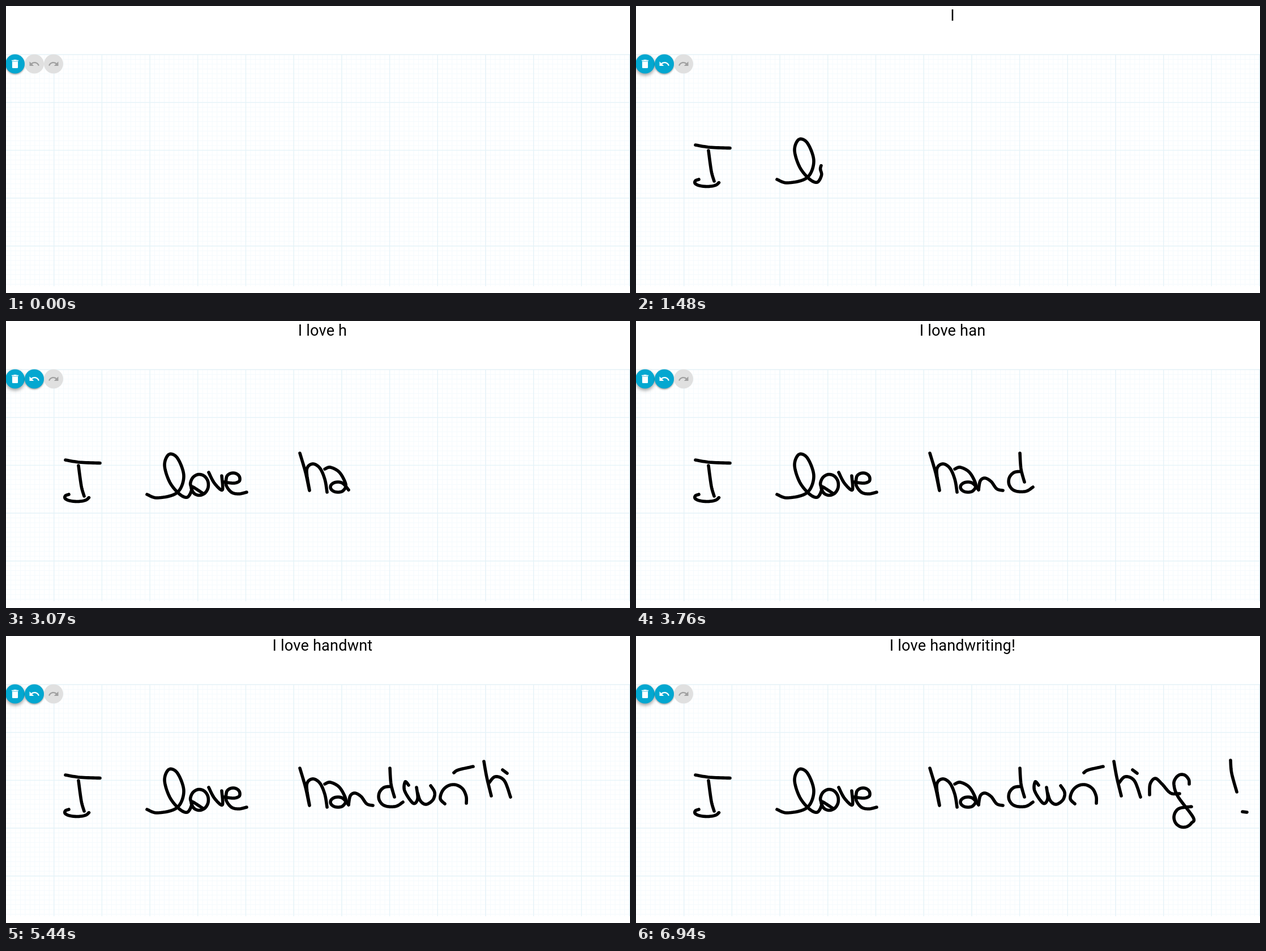
An HTML page with a canvas that plays this animation: 1102x508 px, repeating every 8000 ms.

```html
<!DOCTYPE html>
<html lang="en">
<head>
<meta charset="utf-8">
<title>Handwriting to text</title>
<style>
  html, body { margin: 0; width: 100%; height: 100%; overflow: hidden; background: #fff; }
  canvas { position: absolute; left: 0; top: 0; }
  #result {
    position: absolute; left: 259px; top: 1px; width: 600px;
    font: 400 27.1px/32px Roboto, sans-serif; letter-spacing: .2px;
    text-align: center; white-space: pre; color: #000;
  }
</style>
</head>
<body>
<canvas id="stage" width="1102" height="508"></canvas>
<div id="result"></div>
<script>
const W = 1102, H = 508, LOOP = 8000, SCALE = .847;
const ctx = document.getElementById('stage').getContext('2d');
const result = document.getElementById('result');

const BLUE = '#03a7d0', GREY = '#e0e0e0', DIM = '#a0a0a0';
const TRASH = new Path2D('M6 19c0 1.1.9 2 2 2h8c1.1 0 2-.9 2-2V7H6v12zM19 4h-3.5l-1-1h-5l-1 1H5v2h14V4z');
const UNDO = new Path2D('M12.5 8c-2.65 0-5.05.99-6.9 2.6L2 7v9h9l-3.62-3.62c1.39-1.16 3.16-1.88 5.12-1.88 3.54 0 6.55 2.31 7.6 5.5l2.37-.78C21.08 11.03 17.15 8 12.5 8z');
const FIRST_INK = 350, PEN_UP = 35, PEN_WIDTH = 5.6;

const captions = [
  [0, ''], [700, 'J'], [950, 'I'], [1850, 'I lo'], [2380, 'I love'],
  [2900, 'I love h'], [3250, 'I love ha'], [3600, 'I love han'],
  [4100, 'I love hand'], [4790, 'I love handwn'], [5350, 'I love handwnt'],
  [5850, 'I love handwntin'], [6250, 'I love handwriting'],
  [6690, 'I love handwriting !'], [6940, 'I love handwriting!']
];

// Key points along an ellipse; degrees run clockwise from the right
function arc(cx, cy, rx, ry, from, to) {
  const n = Math.ceil(Math.abs(to - from) / 40);
  return Array.from({ length: n + 1 }, (_, i) => {
    const a = (from + (to - from) * i / n) * Math.PI / 180;
    return [cx + rx * Math.cos(a), cy + ry * Math.sin(a)];
  });
}

// Catmull-Rom curve through points and arcs
function curve(...parts) {
  const p = parts.flatMap(part => Array.isArray(part[0]) ? part : [part]);
  const out = [p[0]];
  for (let i = 0; i < p.length - 1; i++) {
    const a = p[Math.max(i - 1, 0)], b = p[i], c = p[i + 1], d = p[Math.min(i + 2, p.length - 1)];
    for (let k = 1; k <= 10; k++) {
      const u = k / 10;
      out.push([0, 1].map(j => b[j] + u / 2 * (c[j] - a[j]
        + u * (2 * a[j] - 5 * b[j] + 4 * c[j] - d[j]
        + u * (3 * (b[j] - c[j]) + d[j] - a[j])))));
    }
  }
  return out;
}

const strokes = [];
const gap = (a, b) => Math.hypot(b[0] - a[0], b[1] - a[1]);
const measure = line => line.reduce((sum, p, i) => i ? sum + gap(line[i - 1], p) : 0, 0);

// Writes the lines one after another at an even pen speed
function write(start, end, ...lines) {
  const lengths = lines.map(measure);
  const total = lengths.reduce((a, b) => a + b);
  const speed = total / (end - start - PEN_UP * (lines.length - 1));
  lines.forEach((points, i) => {
    strokes.push({ points, start, speed });
    start += lengths[i] / speed + PEN_UP;
  });
}

// I
write(200, 740,
  curve([105, 246], [130, 250], [166, 251.5]),
  curve([128, 256], [133, 292], [138, 310]),
  curve([111, 307], arc(125, 312, 21.5, 7.5, 200, 5)));
// lo
write(980, 1710,
  curve([249, 307], [268, 313], [302, 304], [314, 275], [303, 243], [288, 236], [280, 255],
    [289, 285], [306, 306], [320, 312], arc(341.5, 290, 16, 18.5, 150, 490), [328, 293], [349, 306]));
// ve
write(1770, 2080,
  curve([358, 268], [368, 287], [382, 299], [381, 274]),
  curve([385, 285], [402, 287], arc(401, 279, 12, 10, 30, -180), [389, 291], [398, 303], [411, 306], [425, 303]));
// ha
write(2400, 3040,
  curve([519, 234], [529, 268], [536, 300], [531, 264], [541, 253], [554, 260], [563, 280], [567, 303]),
  curve([563, 262], [573, 259], [589, 268], [600, 289], arc(586, 294, 13, 9, 40, 320), [605, 299]));
// nd and half of w
write(3100, 4000,
  curve([605, 298], [608, 283], [616, 278], [627, 284], [637, 297], [648, 300]),
  curve(arc(676, 284, 18, 18, 280, 90), [690, 301], [701, 294]),
  curve([678, 234], [680, 262], [686, 285]),
  curve([711, 264], [705, 258], [704, 274], [719, 296], [727, 288], [725, 268]));
// rest of w, r
write(4050, 4420,
  curve([727, 278], [732, 292], [742, 298], [754, 290], [757, 277], [750, 265]),
  curve([775, 297], arc(790, 288, 23, 25, 180, 350), [813, 296]));
write(4490, 4650, curve([791, 242], [799, 237], [825, 231]));
// ti
write(4940, 5400,
  curve([844, 222], [849, 250], [857, 283]),
  curve([853, 260], [864, 249], [880, 256], [891, 285]),
  curve([877, 237], [885, 243]));
// ng
write(5480, 6040,
  curve([907, 281], [908, 262], [917, 252], [929, 262], [944, 278], [960, 279]),
  curve([977, 262], arc(964, 263, 14, 18, 330, 180), [957, 284], arc(967, 321, 17, 17.5, 0, 250), [981, 302]));
// !
write(6190, 6480,
  curve([1050, 220], [1052, 243], [1061, 276]),
  curve([1071, 311], [1079, 312]));

function drawGrid() {
  const step = 100 * SCALE, top = 86, bottom = 496;
  const rule = (pitch, color, size) => {
    ctx.fillStyle = color;
    for (let x = pitch; x < W + 1; x += pitch) ctx.fillRect(x - size / 2, top, size, bottom - top);
    for (let y = top; y < bottom; y += pitch) ctx.fillRect(0, y - size / 2, W, size);
  };
  rule(step / 10, '#f4fafd', 1);
  rule(step, '#e5f3f8', 1.4);
}

function drawButton(x, icon, enabled, lift, flip) {
  const y = 102.5;
  ctx.save();
  if (enabled) {
    ctx.shadowColor = 'rgba(0,0,0,.4)';
    ctx.shadowBlur = lift * 2;
    ctx.shadowOffsetY = lift;
  }
  ctx.fillStyle = enabled ? BLUE : GREY;
  ctx.beginPath();
  ctx.arc(x, y, 17, 0, Math.PI * 2);
  ctx.fill();
  ctx.restore();

  ctx.save();
  ctx.translate(x, y);
  ctx.scale(flip ? -SCALE : SCALE, SCALE);
  ctx.translate(-12, -12);
  ctx.fillStyle = enabled ? '#fff' : DIM;
  ctx.fill(icon);
  ctx.restore();
}

function drawStroke({ points, start, speed }, t) {
  if (t < start) return;
  let left = (t - start) * speed;
  ctx.beginPath();
  ctx.moveTo(...points[0]);
  for (let i = 1; i < points.length && left > 0; i++) {
    const a = points[i - 1], b = points[i], d = gap(a, b);
    const u = Math.min(1, left / d);
    ctx.lineTo(a[0] + (b[0] - a[0]) * u, a[1] + (b[1] - a[1]) * u);
    left -= d;
  }
  ctx.stroke();
}

function render(t) {
  ctx.fillStyle = '#fff';
  ctx.fillRect(0, 0, W, H);
  drawGrid();

  const inked = t >= FIRST_INK;
  drawButton(16, TRASH, true, inked ? 3 : 1.5);
  drawButton(50, UNDO, inked, 1.5);
  drawButton(84, UNDO, false, 0, true);

  ctx.strokeStyle = '#000';
  ctx.lineWidth = PEN_WIDTH;
  ctx.lineCap = ctx.lineJoin = 'round';
  for (const s of strokes) drawStroke(s, t);

  const caption = captions.filter(c => c[0] <= t).pop()[1];
  if (result.textContent !== caption) result.textContent = caption;
}

const begin = performance.now();
function tick() {
  render((performance.now() - begin) % LOOP);
  requestAnimationFrame(tick);
}
tick();
</script>
</body>
</html>
```
